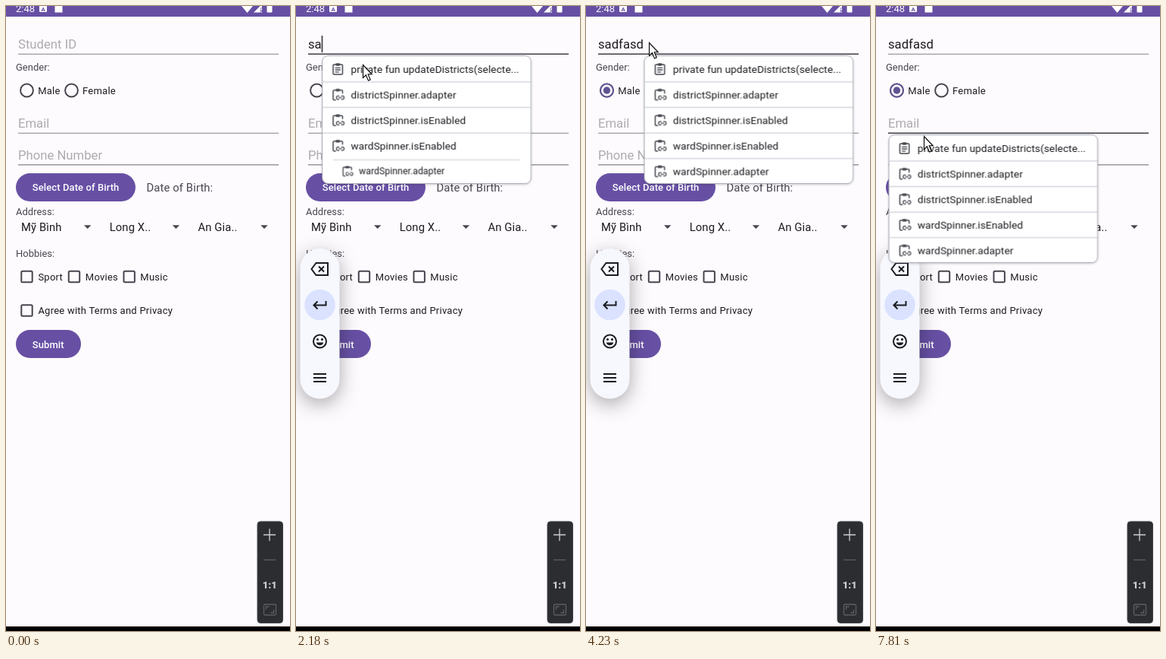
An HTML page that plays this animation: 375 by 822 pixels, repeating every 8000 ms.

```html
<!DOCTYPE html>
<html lang="en">
<head>
<meta charset="utf-8">
<title>Student form</title>
<style>
html, body { margin: 0; width: 100%; height: 100%; overflow: hidden; background: #fefbff; }
svg { display: block; width: 375px; height: 822px; }
text { font-family: Roboto, sans-serif; fill: #1d1b20; white-space: pre; }
.hint { font-size: 16.7px; fill: #aeabb0; }
.typed { font-size: 16.7px; }
.label { font-size: 13px; fill: #49454f; }
.opt { font-size: 13px; letter-spacing: .24px; }
.item { font-size: 14.8px; letter-spacing: .12px; }
.btn { font-size: 13px; font-weight: 500; letter-spacing: .09px; fill: #fff; }
.clip { font-size: 13.7px; letter-spacing: .06px; }
.box { fill: none; stroke: #49454f; stroke-width: 2; }
.line { stroke: #858288; stroke-width: 1.1; }
.active { stroke: #49464c; stroke-width: 1.5; }
.ico { fill: none; stroke: #44464d; stroke-width: 1.5; }
.thin { stroke-width: 1.3; }
.tab { stroke-width: 3.4; }
.rule { stroke: #c2c4d0; }
.key { fill: none; stroke: #1b1c20; stroke-width: 2; }

.type, .place, .caret, .hintOff, .focus1, .focus2, .pop, .row, .hover,
.keys, .radio, .cursor, .ring { animation: 8s linear infinite; }
.type, .place, .caret, .hintOff, .focus1, .focus2, .hover { animation-timing-function: step-end; }

/* 1% = 80ms */
.type { animation-name: type; }
@keyframes type {
  0% { transform: translateX(0); }
  24.9% { transform: translateX(8.6px); }
  26% { transform: translateX(17.7px); }
  28.1% { transform: translateX(27.1px); }
  28.9% { transform: translateX(32.9px); }
  29.8% { transform: translateX(42px); }
  30.6% { transform: translateX(50.6px); }
  32.2%, 100% { transform: translateX(60px); }
}
.hintOff { animation-name: hintOff; }
@keyframes hintOff { 0% { opacity: 1; } 24.9%, 100% { opacity: 0; } }

.caret1 { animation-name: caret1; }
@keyframes caret1 {
  0%, 21.4%, 38.5%, 51.2%, 64.2%, 100% { opacity: 0; }
  15%, 24.9%, 45%, 57.5% { opacity: 1; }
}
.caret2 { animation-name: caret2; }
@keyframes caret2 {
  0%, 72%, 85.2%, 97.6%, 100% { opacity: 0; }
  65.3%, 78.6%, 91.8% { opacity: 1; }
}
.focus1 { animation-name: focus1; }
@keyframes focus1 { 0%, 64.4%, 100% { opacity: 0; } 15% { opacity: 1; } }
.focus2 { animation-name: focus2; }
@keyframes focus2 { 0% { opacity: 0; } 64.4%, 100% { opacity: 1; } }

.place { animation-name: place; }
@keyframes place { 0% { transform: translate(16.5px, 65px); } 70%, 100% { transform: translate(-43.5px, 169px); } }
.pop { animation-name: pop; filter: drop-shadow(0 1px 1.5px #0003); }
@keyframes pop {
  0%, 26%, 66.6%, 73.7% { opacity: 0; }
  26.1%, 65.8%, 73.75%, 100% { opacity: 1; }
}
.row { animation-name: row; animation-fill-mode: backwards; transform-origin: 138px 0; }
@keyframes row { 0%, 26.1% { transform: scale(.8); } 26.9%, 100% { transform: none; } }
.hover { animation-name: hover; }
@keyframes hover { 0%, 39.4%, 100% { opacity: 0; } 32.2% { opacity: 1; } }

.keys { animation-name: keys; }
.pill { filter: drop-shadow(0 7px 13px #0005); }
@keyframes keys { 0%, 25.6% { opacity: 0; } 26.4%, 100% { opacity: 1; } }
.radio { animation-name: radio; }
@keyframes radio { 0%, 38.4% { opacity: 0; } 40%, 100% { opacity: 1; } }

.cursor { animation-name: move; }
.mark { mix-blend-mode: multiply; }
@keyframes move {
  0%, 1.6% { transform: translate(345px, 535px); opacity: 0; }
  1.65% { transform: translate(345px, 535px); opacity: 1; animation-timing-function: cubic-bezier(.3, .3, .4, 1); }
  11.1%, 21.3% { transform: translate(112px, 54px); }
  23.6%, 25.5% { transform: translate(95px, 69px); }
  27%, 32% { transform: translate(88px, 77px); }
  35.4%, 42.6% { transform: translate(27px, 107px); }
  45.6% { transform: translate(45px, 150px); }
  49.3% { transform: translate(95px, 4px); }
  52%, 52.8% { transform: translate(83px, 47px); }
  52.9%, 55.3% { transform: translate(83px, 48px); animation-timing-function: ease-in-out; }
  60.5%, 65.7% { transform: translate(66px, 155px); }
  69.5%, 100% { transform: translate(63px, 171px); opacity: 1; }
}
.ring { animation-name: ring; }
@keyframes ring {
  0%, 11.9%, 16.4%, 35.5%, 39.5%, 61%, 64.9%, 100% { opacity: 0; }
  12.6%, 15.4%, 36%, 38.5%, 61.6%, 64% { opacity: 1; }
}
</style>
</head>
<body>
<svg viewBox="0 0 375 822">
  <defs>
    <clipPath id="typedClip"><rect class="type" x="-84" y="30" width="100" height="32"/></clipPath>
    <path id="drop" d="M-4.7-2.4h9.4L0 2.4z" fill="#49454f"/>
    <rect id="check" class="box" x="-7.2" y="-7.2" width="14.4" height="14.4" rx="1.5"/>
    <g id="note">
      <rect class="ico" x="14.8" y="-6" width="12.5" height="13" rx="1.5"/>
      <path class="ico tab" d="M18.5-6h5"/>
      <path class="ico thin" d="M17.5-1.7h7M17.5 1h7M17.5 3.8h5"/>
    </g>
    <g id="link">
      <path class="ico" d="M18.5 7h-2.2q-1.500 0-1.500-1.500v-10q0-1.500 1.500-1.500h9.500q1.500 0 1.500 1.500v3"/>
      <path class="ico tab" d="M18.5-6h5"/>
      <path class="ico thin" d="M23 1.600h-1.500a2.300 2.300 0 0 0 0 4.600h1.500M25.500 1.600h1.500a2.300 2.300 0 0 1 0 4.600h-1.500M22 3.900h4.500"/>
    </g>
  </defs>

  <rect width="375" height="822" fill="#fefbff"/>

  <!-- status bar -->
  <rect width="375" height="14" fill="#6750a4"/>
  <text x="13" y="7.6" font-size="13" style="fill:#fff">2:48</text>
  <rect x="44" y="-2" width="10" height="10" rx="1.5" fill="#fff"/>
  <text x="46.4" y="6.5" font-size="8" font-weight="700" style="fill:#6750a4">A</text>
  <path d="M64.500 8.500v-8l3-3h7v11z" fill="#fff"/>
  <path d="M311 0q7.500-5 15 0l-7.500 9z M327 8.500l11-11v5h-2v6z" fill="#fff"/>
  <path d="M337.300 3v3M337.300 7v1.500" stroke="#fff" stroke-width="1.3"/>
  <rect x="344.5" y="-4" width="7" height="12.5" rx="1" fill="#fff"/>

  <!-- text fields -->
  <text class="hint hintOff" x="16" y="56">Student ID</text>
  <g clip-path="url(#typedClip)"><text class="typed" x="16" y="56">sadfasd</text></g>
  <g class="type"><path class="caret caret1" d="M16.700 39v22" stroke="#1d1b20" stroke-width="1.4"/></g>
  <path class="line" d="M16 63.300h344M16 167.300h344M16 208.900h344"/>
  <path class="active focus1" d="M16 63.300h344"/>
  <path class="active focus2" d="M16 167.300h344"/>
  <text class="hint" x="16" y="160">Email</text>
  <path class="caret caret2" d="M16.700 142v23" stroke="#1d1b20" stroke-width="1.4"/>
  <text class="hint" x="16" y="201.7">Phone Number</text>

  <!-- gender -->
  <text class="label" x="13" y="84.8">Gender:</text>
  <circle class="box" cx="27.5" cy="111" r="8.4"/>
  <g class="radio">
    <circle cx="27.5" cy="111" r="8.4" fill="#fefbff" stroke="#605392" stroke-width="2"/>
    <circle cx="27.5" cy="111" r="4.7" fill="#605392"/>
  </g>
  <circle class="box" cx="86.5" cy="111" r="8.4"/>
  <text class="opt" x="42.2" y="115.8">Male</text>
  <text class="opt" x="101" y="115.8">Female</text>

  <!-- birth date and address -->
  <rect x="13" y="220" width="158" height="37" rx="18.5" fill="#6750a4"/>
  <text class="btn" x="34.8" y="243.4">Select Date of Birth</text>
  <text class="item" x="185.5" y="244.3" style="fill:#49454f">Date of Birth:</text>
  <text class="label" x="13" y="274.8">Address:</text>
  <text class="item" x="20" y="295.8">Mỹ Bình</text>
  <text class="item" x="136.7" y="295.8">Long X..</text>
  <text class="item" x="253.5" y="295.8">An Gia..</text>
  <use href="#drop" x="107.7" y="290.6"/>
  <use href="#drop" x="224.4" y="290.6"/>
  <use href="#drop" x="341" y="290.6"/>

  <!-- hobbies -->
  <text class="label" x="13" y="329.8">Hobbies:</text>
  <use href="#check" x="27.5" y="356"/>
  <use href="#check" x="90" y="356"/>
  <use href="#check" x="162.7" y="356"/>
  <use href="#check" x="27.5" y="400.5"/>
  <text class="opt" x="42.4" y="360.8">Sport</text>
  <text class="opt" x="104.8" y="360.8">Movies</text>
  <text class="opt" x="177.3" y="360.8">Music</text>
  <text class="opt" x="42.4" y="405.2">Agree with Terms and Privacy</text>
  <rect x="13" y="426" width="86" height="37" rx="18.5" fill="#6750a4"/>
  <text class="btn" x="34.8" y="449.6">Submit</text>

  <!-- floating keys -->
  <g class="keys">
    <rect class="pill" x="5.5" y="319" width="52" height="197.5" rx="26" fill="#f7f8fe"/>
    <circle cx="31.5" cy="393" r="20.3" fill="#dae2ff"/>
    <path class="key" d="M26.500 338h15.500v16h-15.500l-6-8z M30 342.500l7 7M37 342.500l-7 7"/>
    <path class="key" d="M39.500 388v5.500h-15.500M28.500 388.500l-5 5 5 5"/>
    <circle class="key" cx="31.5" cy="441" r="8.5"/>
    <circle cx="28.5" cy="438.5" r="1.5"/><circle cx="34.5" cy="438.5" r="1.5"/>
    <path d="M26.800 442.500h9.400a4.800 4.800 0 0 1-9.400 0z" fill="#1b1c20"/>
    <path class="key" d="M23 484h17M23 489h17M23 494h17"/>
  </g>

  <!-- clipboard popup -->
  <g class="type"><g class="place"><g class="pop">
    <rect x=".5" y=".5" width="275.5" height="168" rx="7.5" fill="#fff" stroke="#adafb9"/>
    <path class="hover" d="M1 34.800V8q0-7 7-7h260q7 0 7 7v26.800z" fill="#dfdfe0"/>
    <g transform="translate(0 18)"><g class="row">
      <use href="#note"/><text class="clip" x="38.2" y="4.7">private fun updateDistricts(selecte...</text>
    </g></g>
    <g transform="translate(0 51.6)"><g class="row" style="animation-delay:15ms">
      <path class="rule" d="M0-16.800h276"/><use href="#link"/><text class="clip" x="38.2" y="4.7">districtSpinner.adapter</text>
    </g></g>
    <g transform="translate(0 85.2)"><g class="row" style="animation-delay:20ms">
      <path class="rule" d="M0-16.800h276"/><use href="#link"/><text class="clip" x="38.2" y="4.7">districtSpinner.isEnabled</text>
    </g></g>
    <g transform="translate(0 118.8)"><g class="row" style="animation-delay:25ms">
      <path class="rule" d="M0-16.800h276"/><use href="#link"/><text class="clip" x="38.2" y="4.7">wardSpinner.isEnabled</text>
    </g></g>
    <g transform="translate(0 152.4)"><g class="row" style="animation-delay:63ms">
      <path class="rule" d="M0-16.800h276"/><use href="#link"/><text class="clip" x="38.2" y="4.7">wardSpinner.adapter</text>
    </g></g>
  </g></g></g>

  <!-- zoom panel -->
  <rect x="332" y="678" width="33.5" height="133.5" rx="4" fill="#2b2d30" stroke="#45474c"/>
  <path d="M340 695.500h16M348 687.500v16" stroke="#ced0d6" stroke-width="1.3"/>
  <path d="M340 728.500h16" stroke="#5c5e63" stroke-width="1.3"/>
  <text x="348.3" y="766" font-size="13" font-weight="900" text-anchor="middle" style="fill:#ced0d6">1:1</text>
  <g fill="none" stroke="#5c5e63" stroke-width="1.3">
    <rect x="340.5" y="787" width="16" height="14" rx="1.5"/>
    <path d="M343.500 794v-4h4M353.500 794v4h-4"/>
  </g>
  <rect y="816" width="375" height="6" fill="#000"/>

  <!-- pointer -->
  <g class="cursor mark"><circle class="ring" r="15.3" fill="#fbf04a"/></g>
  <g class="cursor">
    <path d="M.5.5v17l3.900-3.700 3.100 7.300 2.700-1.100-3-7.200h5z" fill="#fff" stroke="#000" stroke-width="1.1"/>
  </g>
</svg>
</body>
</html>
```
